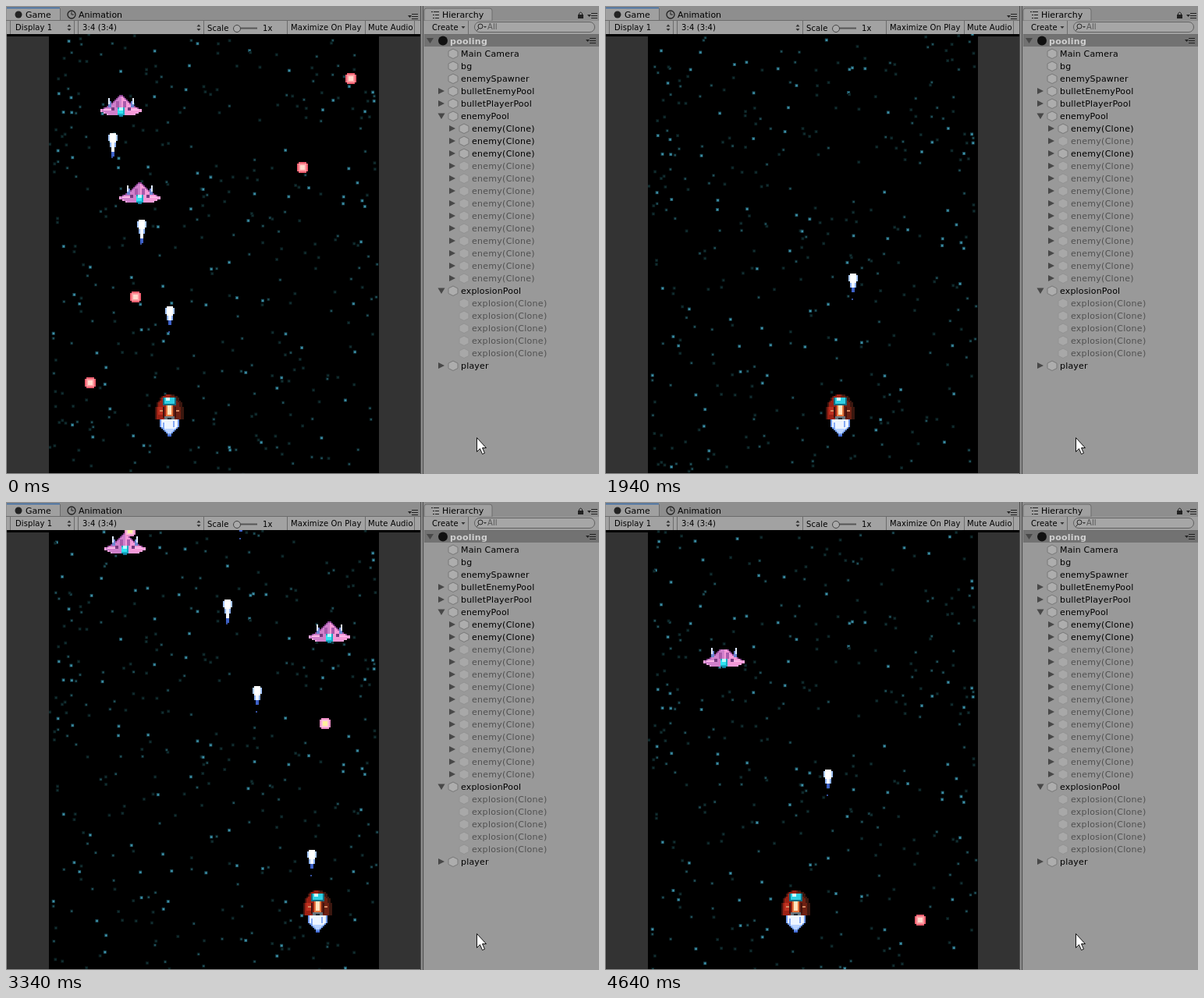
An HTML page with a canvas for the animation above (4.67 s loop, 760 by 600 pixels).

```html
<!DOCTYPE html>
<html lang="en">
<head>
<meta charset="utf-8">
<title>Object pooling</title>
<style>
  html, body { margin: 0; width: 100%; height: 100%; overflow: hidden; background: #999; }
  svg, canvas { position: absolute; left: 0; top: 0; display: block; }
  canvas { left: 55px; top: 36px; }
  text { font: 11px "DejaVu Sans", sans-serif; white-space: pre; }
  .small text { font-size: 10px; letter-spacing: .1px; }
  #rows text { letter-spacing: .17px; }
  #rows .child text { letter-spacing: .27px; }
  #rows .off text { fill: #505050; }
  #rows .off .cube { fill: #a8a8a8; stroke: #929292; }
  .cube { fill: #adadad; stroke: #787878; }
  .arrow { fill: #484848; }
  .line { fill: none; stroke: #6c6c6c; }
  .ink { fill: none; stroke: #222; }
</style>
</head>
<body>
<svg width="760" height="600">
  <rect width="760" height="600" fill="#8e8e8e"/>
  <path d="M1 19V3H69V19Z" fill="#a0a0a0"/>
  <path d="M1 2.5H69" stroke="#3c6ea8" stroke-width="1.5"/>
  <path d="M69.5 3V19" class="line"/>
  <rect x="1" y="19" width="530" height="17" fill="#a2a2a2"/>
  <path d="M0 18.5H531M5.5 19V36M87.5 19V36M92.5 19V36M253.5 19V36M360.5 19V36M460.5 19V36M523.5 19V36" class="line"/>
  <rect x="1" y="36" width="530" height="563" fill="#333"/>
  <rect x="1" y="36" width="530" height="3" fill="#000"/>
  <path d="M531.5 0V600M534.5 0V600" stroke="#505050"/>

  <circle cx="16" cy="11" r="4.5" fill="#222"/>
  <circle cx="84" cy="11" r="5" class="ink" stroke-width="1.3"/>
  <path d="M84 7.5V11H87" class="ink"/>
  <text x="25" y="15">Game</text>
  <text x="93" y="15">Animation</text>
  <g class="small">
    <text x="12" y="31">Display 1</text>
    <text x="98" y="31">3:4 (3:4)</text>
    <text x="258" y="32">Scale</text>
    <text x="329" y="32">1x</text>
    <text x="365" y="31">Maximize On Play</text>
    <text x="464" y="31">Mute Audio</text>
  </g>
  <g id="picker"><path d="M78.5 26.5 81 23.5 83.5 26.5ZM78.5 29 81 32 83.5 29Z" fill="#333"/></g>
  <use href="#picker" x="166"/>
  <path d="M295 28.5H322" stroke="#555" stroke-width="2"/>
  <circle cx="296" cy="29" r="4.5" fill="#aaa" stroke="#444"/>

  <rect x="536" y="19" width="224" height="581" fill="#999"/>
  <path d="M536 19V6Q536 3 539 3H620Q623 3 623 6V19Z" fill="#a0a0a0" stroke="#6c6c6c"/>
  <rect x="536" y="19" width="224" height="17" fill="#a0a0a0"/>
  <path d="M536 36.5H760M592.5 19V36" class="line"/>
  <path d="M545 7.5H547M548 7.5H555M547 11.5H549M550 11.5H555M547 15.5H549M550 15.5H555" class="ink"/>
  <text x="559" y="15">Hierarchy</text>
  <g class="small">
    <text x="546" y="31">Create</text>
    <rect x="600.5" y="20.5" width="154" height="13" rx="6.5" fill="#a6a6a6" stroke="#606060"/>
    <text x="617" y="30" fill="#555">All</text>
  </g>
  <path d="M583.5 26H588.5L586 29ZM612 26H616L614 28Z" fill="#333"/>
  <circle cx="608" cy="26" r="3" class="ink"/>
  <path d="M606 28.5 603.5 31.5" class="ink"/>
  <rect x="733" y="11" width="7" height="5" fill="#222"/>
  <path d="M734.5 11V9.5Q736.5 6.5 738.5 9.5V11" class="ink"/>
  <g id="menu"><path d="M745 11H750L747.5 14Z" fill="#222"/><path d="M750 9.5H758M750 12.5H758M750 15.5H758" class="ink"/></g>
  <use href="#menu" x="-230" y="1"/>

  <rect x="536" y="37" width="224" height="15" fill="#727272"/>
  <path d="M539 41H548L543.5 48Z" class="arrow"/>
  <circle cx="560" cy="44.5" r="6" fill="#111"/>
  <text x="569" y="49" fill="#d0d0d0" style="font-weight:bold;letter-spacing:.26px">pooling</text>
  <use href="#menu" x="-2" y="32"/>
  <g id="rows"></g>
  <path d="M603.5 553.5V571.5L607.5 567.5 610.5 574.5 613.5 573.2 610.5 566.5H615.5Z" fill="#fff" stroke="#111"/>
</svg>
<canvas id="view" width="423" height="563"></canvas>
<script>
// ---------- hierarchy ----------
const ENEMY_ROW = 6, BLAST_ROW = 20;
const tree = [
  ['Main Camera'], ['bg'], ['enemySpawner'],
  ['bulletEnemyPool', 'right'], ['bulletPlayerPool', 'right'],
  ['enemyPool', 'down'], ...Array(13).fill(['enemy(Clone)', 'right', true]),
  ['explosionPool', 'down'], ...Array(5).fill(['explosion(Clone)', '', true]),
  ['player', 'right']
];
const arrows = { right: 'M-4-4V4L4 0Z', down: 'M-4.5-3.5H4.5L0 4Z' };
const list = document.getElementById('rows');
list.innerHTML = tree.map(([name, arrow, child], i) => `
  <g class="${child ? 'child' : ''}" transform="translate(${child ? 14 : 0} ${61 + 16 * i})">
    ${arrow ? `<path class="arrow" transform="translate(558 0)" d="${arrows[arrow]}"/>` : ''}
    <path class="cube" transform="translate(573 0)" d="M0-6 6-3V3.5L0 6.5-6 3.5V-3Z"/>
    <text x="583" y="4">${name}</text>
  </g>`).join('');
const setRow = (i, on) => list.children[i].classList.toggle('off', !on);

// ---------- sprites, drawn at half size ----------
function sprite(w, h, draw) {
  const c = document.createElement('canvas');
  c.width = w;
  c.height = h;
  const g = c.getContext('2d');
  const box = (color, x, y, bw, bh = 1) => {
    g.fillStyle = color;
    g.fillRect(x, y, bw, bh);
  };
  const pair = (color, x, y, bw, bh) => {
    box(color, x, y, bw, bh);
    box(color, w - x - bw, y, bw, bh);
  };
  draw(box, pair);
  return c;
}
const twoPoses = (w, h, draw) => [0, 1].map(pose => sprite(w, h, (box, pair) => draw(box, pair, pose)));

const enemyArt = twoPoses(28, 14, (box, pair, pose) => {
  for (let y = 2 * pose; y < 13; y++) {
    const x = y < 7 ? 13 - y : 2 * Math.abs(9.5 - y);
    box('#d080cb', x, y, 14 - x);
    box('#f69ad9', 14, y, 14 - x);
    pair(y > 8 ? '#f9a5df' : '#8d4695', x, y, 1);
  }
  pair('#a95bac', 11, 4, 2, 4);
  pair('#75397f', 8, 8, 2, 2);
  pair('#ffb9e9', 3, 9, 5);
  pair('#6c84cf', 6, 4 - pose, 2, 4);
  pair('#e4efff', 6, 2 - pose, 1, 4);
  box('#16aac4', 12, 8, 4, 5);
  box('#2ee4f2', 12, 9, 3, 3);
  box('#b8fbff', 13, 8, 2, 2);
  box('#117f9d', 13, 13, 2);
});

const playerArt = twoPoses(18, 27, (box, pair, pose) => {
  for (let y = 0; y < 10; y++) {
    const half = Math.min(6, 10 - y);
    box('#6d98ee', 9 - half, 16 + y, 2 * half);
    box(y < 6 ? '#eef5ff' : '#b9d3ff', 10 - half, 16 + y, 2 * half - 2);
  }
  box('#87abf4', 5 + pose, 18, 1, 4);
  box('#87abf4', 11 + pose, 17, 1, 4);
  box('#426bd5', 8, 26 - pose, 2);
  for (let y = 0; y < 16; y++) {
    const x = 9 - Math.round(9 * Math.sqrt(1 - (Math.max(0, 12 - y) / 13) ** 2));
    box('#9c2114', x, y, 9 - x);
    box('#6d2113', 9, y, 9 - x);
    box('#45130d', x, y, 1);
    box('#3b170f', 16 - x, y, 2);
  }
  box('#bd3020', 2, 8, 3, 5);
  pair('#41130e', 5, 8, 1, 7);
  pair('#d98a62', 3, 10, 2);
  box('#126f83', 5, 2, 8, 5);
  box('#2fcfe2', 6, 2, 6, 4);
  box('#d6ffff', 7, 2, 2, 2);
  box('#e8793f', 7, 7, 4, 7);
  box('#ffe6c0', 8, 7, 2, 6);
  box('#68747d', 6, 14, 6, 2);
  box('#22282f', 8, 15, 2);
});

const shotArt = twoPoses(6, 17, (box, pair, broken) => {
  box('#a9c9ff', 0, 1, 6, 4);
  box('#fff', 1, 0, 4, 6);
  box('#8fb4f8', 1, 6, 4, 3);
  box('#f2f7ff', 2, 6, 2, broken ? 3 : 6);
  box('#3d61c8', 2, broken ? 9 : 12, 2, 3);
  box('#35509f', 2, broken ? 16 : 15, 1);
});

const orbArt = twoPoses(7, 7, (box, pair, hot) => {
  const rim = hot ? '#f08fc9' : '#ef5f70';
  box(rim, 1, 0, 5, 7);
  box(rim, 0, 1, 7, 5);
  box(hot ? '#ffc4dc' : '#ff9aa0', 1, 1, 5, 5);
  box(hot ? '#fff0a0' : '#ffd9cc', 2, 2, 3, 3);
});

// ---------- the fight; time is counted in screen updates ----------
const LOOP = 4670, TICK = 46.25, LAST = 100;
const SHOT_SPEED = 24, SHOT_Y = 470, RELOAD = 4.63;
const ENEMY_SPEED = 5.15, SPAWN_Y = -7, REACH = 30;
const ORB_SPEED = 9, POSE = 5.02, BLAST = 5;

// tick, x
const path = [[-13, 135], [-3.6, 210], [0, 209], [8.1, 144], [26, 286.5], [30, 318], [36.7, 318],
  [38.9, 300.5], [55.5, 301], [57.6, 284], [71, 392], [76.6, 430], [81, 394.5], [100, 243.5]];

function shipX(n) {
  const i = Math.max(1, path.findIndex(p => p[0] >= n));
  const [n0, x0] = path[i - 1], [n1, x1] = path[i];
  return x0 + (x1 - x0) * (n - n0) / (n1 - n0);
}

// first tick, number of shots
const bursts = [[-12.8, 3], [3.2, 6], [36.7, 1], [47.7, 1], [53, 3], [71, 2], [94.7, 1]];
const shots = bursts.flatMap(([first, count]) => Array.from({ length: count }, (_, i) => {
  const start = first + i * RELOAD;
  return { start, x: shipX(start), end: Infinity };
}));

// pool slot, x, y at tick 0
const enemies = [
  [0, 147, 130], [1, 171, 242], [2, 303, 15.6], [0, 165, -90], [2, 318, -209],
  [0, 414, -201.6], [1, 152, -315], [2, 420, -395], [0, 250, -509]
].map(([slot, x, y]) => ({ slot, x, y, from: (SPAWN_Y - y) / ENEMY_SPEED, to: Infinity }));

// each enemy dies by the first free shot that meets it
for (const e of enemies) {
  let killer;
  for (const s of shots) {
    const meet = (SHOT_Y - 10 - e.y + SHOT_SPEED * s.start) / (SHOT_SPEED + ENEMY_SPEED);
    if (s.end === Infinity && Math.abs(s.x - e.x) < REACH && meet > e.from && meet < e.to) {
      e.to = meet;
      killer = s;
    }
  }
  if (killer) killer.end = e.to;
}

// start tick, x, y, side (-1 left, 0 down, 1 right)
const orbs = [[0, 442, 93, 1], [0, 380, 207, 1], [0, 166, 373, 0], [0, 108, 483, 0],
  ...[-1, 0, 1].map(side => [46, 413, 50, side])];

// ---------- starfield ----------
let seed = 41;
const rand = () => (seed = seed * 16807 % 2147483647) / 2147483647;
const stars = Array.from({ length: 480 }, () => {
  const x = 56 + rand() * 420, y = 30 + rand() * 700, tone = rand();
  if (tone < .22) return [x, y, '#3d91a8', '#1b4a57'];
  return [x, y, tone < .5 ? '#20505a' : '#122f31', '#081719'];
});

// ---------- drawing ----------
const ctx = document.getElementById('view').getContext('2d');
ctx.translate(-55, -36);
ctx.imageSmoothingEnabled = false;

const put = (art, x, y, w, h) => ctx.drawImage(art, Math.round(x), Math.round(y), w, h);

function ellipse(color, x, y, rx, ry) {
  ctx.fillStyle = color;
  ctx.beginPath();
  ctx.ellipse(x, y, rx, ry, 0, 0, 7);
  ctx.fill();
}

function blast(x, y, age) {
  const k = age / BLAST, r = 43 * Math.sin(Math.min(1, .35 + k) * Math.PI / 2);
  ellipse('#f4690c', x, y, r, r * .87);
  ellipse('#ffb400', x, y, r - 4, r * .87 - 4);
  if (k < .5) ellipse('#fff0a0', x, y, r * .6, r * .5);
  if (k > .7) {
    ellipse('#f4690c', x, y + 4, 11, 16);
    ellipse('#000', x, y + 4, 8, 13);
  }
}

function draw(n) {
  ctx.fillStyle = '#000';
  ctx.fillRect(55, 36, 423, 563);

  const drift = 1.28 * (n - LAST);
  for (const [x, y, core, halo] of stars) {
    ctx.fillStyle = halo;
    ctx.fillRect(x - 2, y + drift - 2, 4, 4);
    ctx.fillStyle = core;
    ctx.fillRect(x - 1, y + drift - 1, 2.4, 2.4);
  }

  for (const { start, x, end } of shots) {
    const age = n - start;
    if (age >= 0 && n < end) put(shotArt[Math.floor(age + .1) % 2], x - 6, SHOT_Y - SHOT_SPEED * age, 12, 34);
  }

  put(playerArt[n % 2], shipX(n) - 18, 498, 37, 54);

  const pose = Math.floor(n / POSE) % 2;
  const live = new Set(), blasts = [];
  for (const { slot, x, y, from, to } of enemies) {
    if (n >= from && n < to) {
      live.add(slot);
      put(enemyArt[pose], x - 28, y + ENEMY_SPEED * n - 16 + pose, 57, 28);
    } else if (n >= to && n < to + BLAST) {
      blasts.push([x, y + ENEMY_SPEED * to, n - to]);
    }
  }

  const hot = (n + 9) % 10 < 5 ? 1 : 0;
  for (const [start, x, y, side] of orbs) {
    const age = n - start;
    const dx = side * 9.6 - .17, dy = side ? -.5 : ORB_SPEED;
    if (age >= 0) put(orbArt[hot], x + dx * age - 7, y + dy * age - 7, 14, 14);
  }
  blasts.forEach(b => blast(...b));

  for (let i = 0; i < 13; i++) setRow(ENEMY_ROW + i, live.has(i));
  for (let i = 0; i < 5; i++) setRow(BLAST_ROW + i, i < blasts.length);
}

const start = performance.now();
let shown = -1;
function frame() {
  const t = (performance.now() - start) % LOOP;
  const n = Math.min(LAST, Math.floor((t + 10) / TICK));
  if (n !== shown) draw(shown = n);
  requestAnimationFrame(frame);
}
frame();
</script>
</body>
</html>
```
